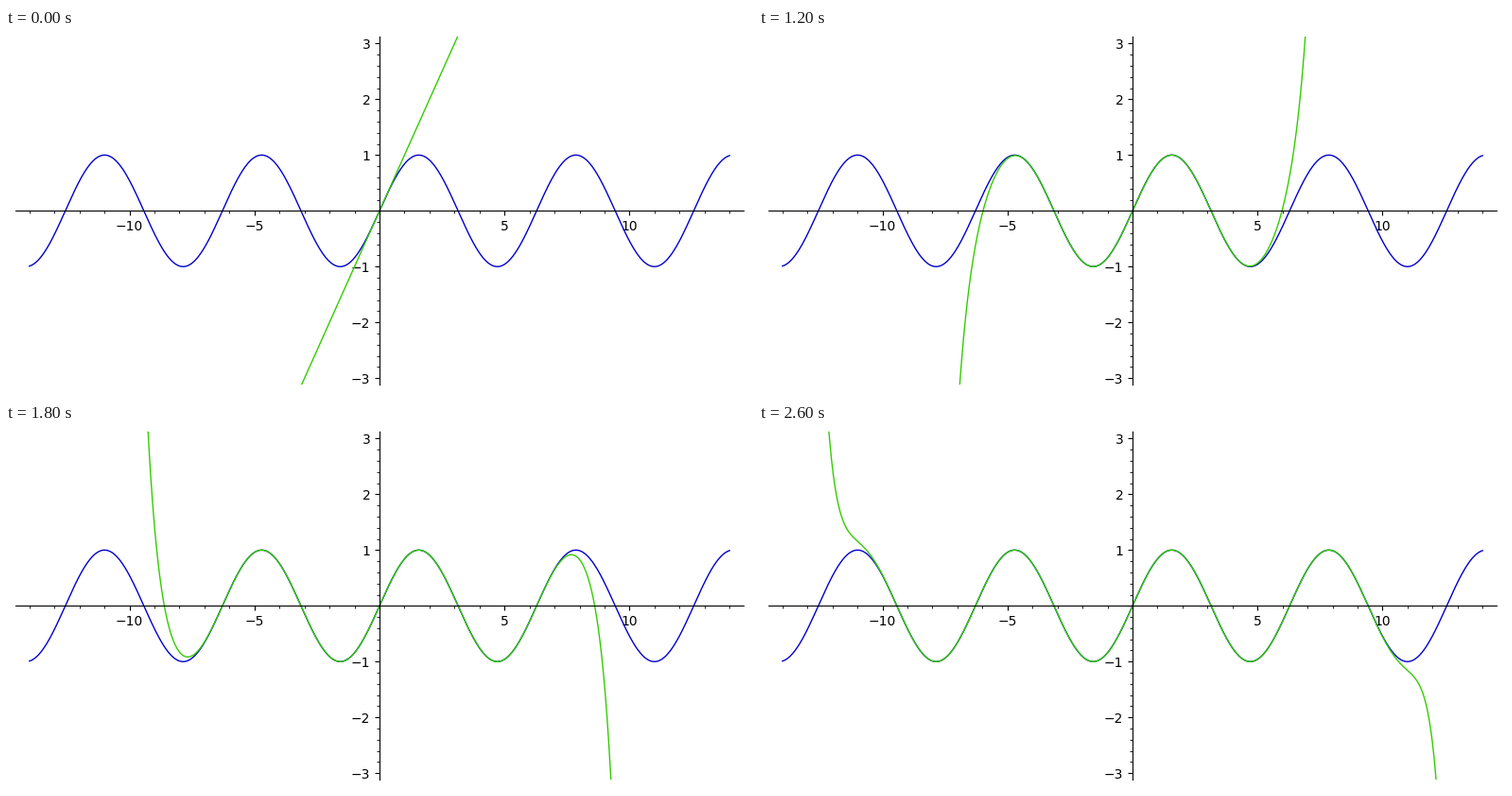
These frames come from a looping animation (790x388 px, 2800 ms). A matplotlib script:

```python
import math

import numpy as np
import matplotlib.pyplot as plt
from matplotlib.animation import FuncAnimation
from matplotlib.ticker import AutoMinorLocator, FuncFormatter, MultipleLocator

W, H, DPI = 790, 388, 100
FRAMES, INTERVAL = 14, 200
X_MAX, Y_MAX, PAD = 14, 3, 1.04
LEFT, TOP, AX_W, AX_H = 10, 9.3, 770, 368
BLUE, GREEN = "#0000cc", "#33cc00"

plt.rcParams["font.family"] = "DejaVu Sans"


def taylor_sin(x, terms):
    """Partial sum of the sine series with the given number of terms."""
    return sum((-1) ** k * x ** (2 * k + 1) / math.factorial(2 * k + 1)
               for k in range(terms))


def label(value, _):
    return "" if abs(value) < 1e-9 else f"{value:.0f}".replace("-", "\u2212")


def setup_axis(axis, step):
    axis.set_major_locator(MultipleLocator(step))
    axis.set_minor_locator(AutoMinorLocator(5))
    axis.set_major_formatter(FuncFormatter(label))


fig = plt.figure(figsize=(W / DPI, H / DPI), dpi=DPI, facecolor="white")
ax = fig.add_axes([LEFT / W, 1 - (TOP + AX_H) / H, AX_W / W, AX_H / H])
ax.set_xlim(-X_MAX * PAD, X_MAX * PAD)
ax.set_ylim(-Y_MAX * PAD, Y_MAX * PAD)

# Axes cross at the origin
for side in ("left", "bottom"):
    ax.spines[side].set_position("zero")
for side in ("right", "top"):
    ax.spines[side].set_visible(False)
setup_axis(ax.xaxis, 5)
setup_axis(ax.yaxis, 1)

x = np.linspace(-X_MAX, X_MAX, 1201)
ax.plot(x, np.sin(x), color=BLUE, lw=1)
approx, = ax.plot(x, x, color=GREEN, lw=1)


def update(frame):
    approx.set_ydata(taylor_sin(x, frame + 1))
    return approx,


anim = FuncAnimation(fig, update, frames=FRAMES, interval=INTERVAL,
                     repeat=True, repeat_delay=0, blit=False)
plt.show()
```
